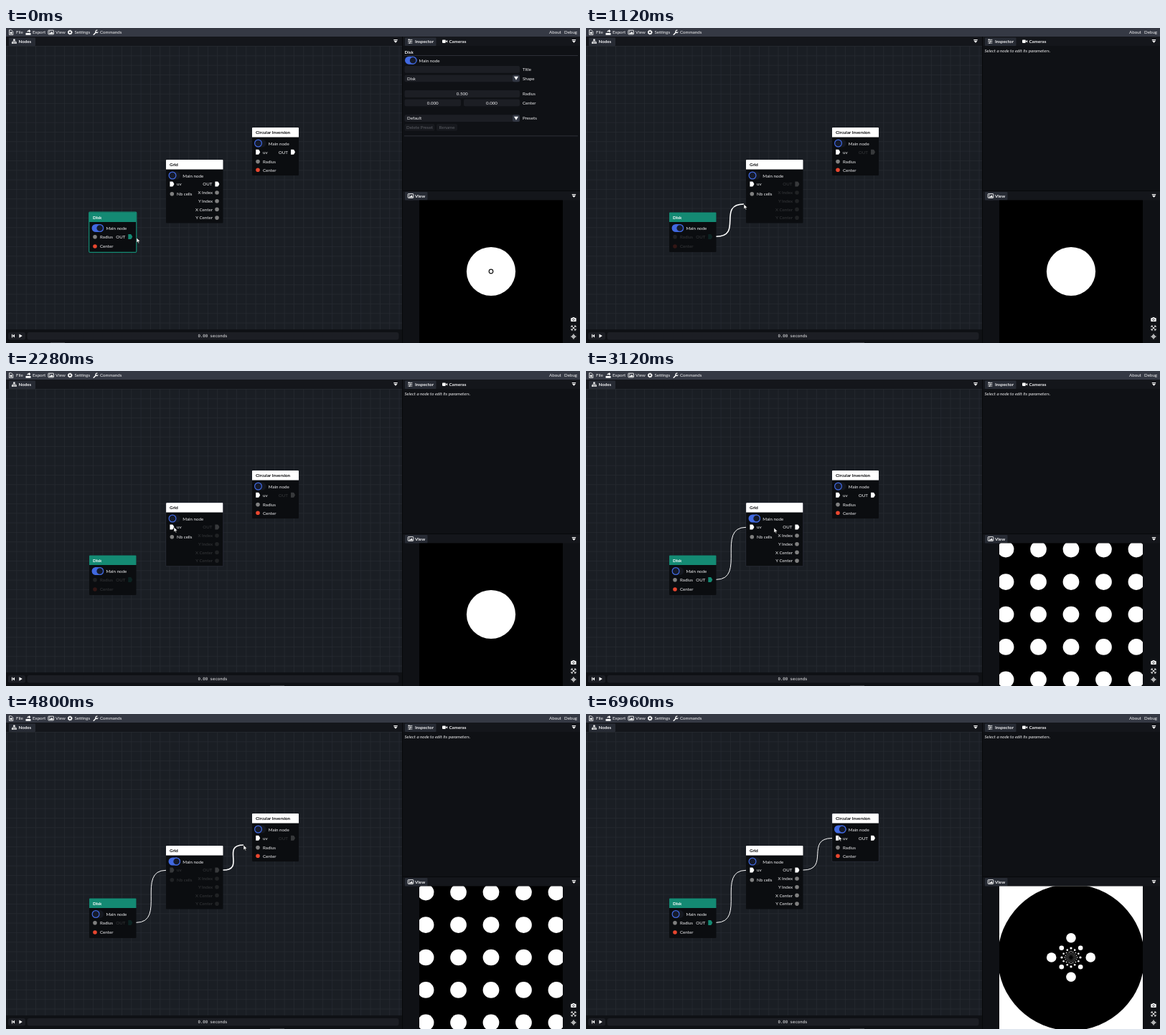
Recreate the animation shown at these times as an HTML page. Size 800 by 440 pixels, loop 7 s.

```html
<!DOCTYPE html>
<html lang="en">
<head>
<meta charset="utf-8">
<title>Node editor</title>
<style>
  html, body { margin: 0; width: 100%; height: 100%; overflow: hidden; background: #0f1115; }
  svg { display: block; width: 800px; height: 440px; }
  text { font: 6.2px Lato, "Open Sans", sans-serif; fill: #f2f2f4; white-space: pre; }
  .bold { font-weight: 700; }
  .italic { font-style: italic; }
  .mono { font: 5.7px "DejaVu Sans Mono", monospace; }
</style>
</head>
<body>
<svg id="stage" viewBox="0 0 800 440" xmlns="http://www.w3.org/2000/svg"></svg>
<script>
const LOOP = 7000, STEP = 40;
const PRESS_1 = 360, RELEASE_1 = 2240, LINKED_1 = 2320;
const PRESS_2 = 3800, RELEASE_2 = 6560, LINKED_2 = 6600;
const TEAL = '#148a73', BLUE = '#4169e1', GREY = '#808080', RED = '#e8462f', WHITE = '#ffffff';
const FIELD = '#1c1e24', PANEL = '#0f1115';

// Drawing helpers; text is placed by its vertical centre.
const rect = (x, y, w, h, fill, r = 0, extra = '') =>
  `<rect x="${x}" y="${y}" width="${w}" height="${h}" rx="${r}" fill="${fill}" ${extra}/>`;
const circle = (x, y, r, fill, extra = '') =>
  `<circle cx="${x}" cy="${y}" r="${r}" fill="${fill}" ${extra}/>`;
const path = (d, fill = WHITE, extra = '') => `<path d="${d}" fill="${fill}" ${extra}/>`;
const text = (x, y, label, { cls = '', anchor = 'start', fill = '' } = {}) =>
  `<text x="${x}" y="${y + 2.2}" class="${cls}" text-anchor="${anchor}" ${fill && `style="fill:${fill}"`}>${label}</text>`;
const stroke = (color, width) => `stroke="${color}" stroke-width="${width}"`;
const group = (id, body) => `<g id="${id}">${body}</g>`;

const toggle = (id, x, y) =>
  rect(x, y - 5.5, 16.5, 11, '#15181f', 5.5, `id="${id}-pill"`) +
  circle(x + 5.5, y, 4.9, '#161b2b', `id="${id}-knob" ${stroke(BLUE, 1.2)}`);

const flowPin = (x, y, color = WHITE) =>
  path(`M${x} ${y - 3.5}h3.2q1 0 1.4 .8l1.4 2.7-1.4 2.7q-.4 .8-1.4 .8h-3.2z`, color);
const dotPin = (x, y, color = GREY) => circle(x, y, 2.8, color);
const menuArrow = (x, y) =>
  path(`M${x - 2.7} ${y - 2.4}h5.4v.9h-5.4zM${x - 2.7} ${y - .6}h5.4l-2.7 3z`);

const nodes = {
  disk: { x: 116, y: 257.5, w: 65.5, h: 55.5, title: 'Disk', color: TEAL, ink: WHITE, pill: [119.6, 279.5] },
  grid: { x: 223, y: 184, w: 79.5, h: 88.5, title: 'Grid', color: WHITE, ink: '#08090b', pill: [226.5, 206] },
  inv: { x: 343, y: 139, w: 65, h: 67, title: 'Circular Inversion', color: WHITE, ink: '#08090b', pill: [346, 161] }
};

const rightText = (x, y, label) => text(x, y, label, { anchor: 'end' });
const ports = {
  disk: {
    in: dotPin(124, 291.8) + text(131, 291.8, 'Radius') + dotPin(124, 305, RED) + text(131, 305, 'Center'),
    out: rightText(166.5, 291.8, 'OUT') + flowPin(170.3, 291.6, TEAL)
  },
  grid: {
    in: flowPin(228.4, 218) + text(238, 218, 'uv') + dotPin(231.3, 231.7) + text(238, 231.7, 'Nb cells'),
    out: rightText(287.5, 218, 'OUT') + flowPin(291.4, 218) +
      ['X Index', 'Y Index', 'X Center', 'Y Center'].map((label, i) => {
        const y = 230 + i * 11.7;
        return rightText(288, y, label) + dotPin(294, y);
      }).join('')
  },
  inv: {
    in: flowPin(348.2, 173.2) + text(358, 173.4, 'uv') + dotPin(351, 186.6) + text(358, 186.6, 'Radius') +
      dotPin(351, 198.3, RED) + text(358, 198.3, 'Center'),
    out: rightText(393, 173.4, 'OUT') + flowPin(397, 173.2)
  }
};

function drawNode(id) {
  const { x, y, w, h, title, color, ink, pill } = nodes[id];
  return rect(x, y, w, h, '#0b0d10', 1) +
    path(`M${x} ${y + 13.4}v-12.4q0-1 1-1h${w - 2}q1 0 1 1v12.4z`, color) +
    text(x + 5, y + 6.8, title, { cls: 'bold', fill: ink }) +
    toggle(id, ...pill) + text(pill[0] + 19.8, pill[1] + .3, 'Main node') +
    group(id + '-in', ports[id].in) + group(id + '-out', ports[id].out) +
    rect(x - .3, y - .3, w + .6, h + .6, 'none', 1.2, `id="${id}-edge"`);
}

function drawMenu() {
  const labels = [[14, 'File'], [37, 'Export'], [69, 'View'], [95.5, 'Settings'], [131, 'Commands'], [757, 'About'], [778, 'Debug']];
  return rect(0, 0, 800, 12, '#353944') +
    path('M4.5 2.8h3l2.3 2.3v4.4h-5.3z', 'none', stroke(WHITE, .8)) + path('M5.7 5.5h2.8v2.8h-2.8z') +
    path('M27.5 7h7v2.8h-7zM29 5.7q1-2.6 3-2.4v-1.2l2.4 2.2-2.4 2.2v-1.4q-1.500-.2-3 .6z') +
    pictureIcon(62.7, 6) +
    circle(89.2, 6, 2.1, 'none', stroke(WHITE, 1.5)) +
    circle(89.2, 6, 3, 'none', stroke(WHITE, .9) + ' stroke-dasharray="1.2 1.156"') +
    path('M122.2 9.300l3.500-3.500', 'none', stroke(WHITE, 1.5) + ' stroke-linecap="round"') +
    path('M127.4 3.400a1.700 1.700 0 1 0 .8 2', 'none', stroke(WHITE, 1.2)) +
    labels.map(([x, label]) => text(x, 6.1, label)).join('');
}

function pictureIcon(x, y) {
  return rect(x - 3.8, y - 2.8, 7.6, 5.7, 'none', .7, stroke(WHITE, .9)) +
    circle(x - 1.800, y - 1, .7, WHITE) + path(`M${x - 3} ${y + 2}l1.500-1.700 1 .8 1.800-2.300 1.900 3.200z`);
}

function cameraIcon(x, y) {
  return rect(x - 3.7, y - 2, 7.4, 5, WHITE, .8) + rect(x - 1.5, y - 3, 3, 1.5, WHITE, .5) +
    circle(x, y + .4, 1.4, WHITE, stroke('#14161a', .7));
}

function drawTabs() {
  const treeIcon = rect(10.2, 15.5, 2.4, 2.2, WHITE) + [8, 10.4, 12.8].map(x => rect(x, 19.6, 1.900, 2.2, WHITE)).join('') +
    path('M11.400 17.500v2M9 19.600v-1h4.800v1', 'none', stroke(WHITE, .6));
  const listIcon = [16.3, 18.600, 20.9].map((y, i) =>
    rect(560.2, y - .4, 6.2, .8, WHITE) + rect(561 + (i * 2) % 3, y - .8, 1.2, 1.6, WHITE)).join('');
  return rect(0, 12, 552, 13, '#14161b') + rect(4, 13.5, 37, 11.5, '#272b34', 1) + treeIcon +
    text(17.5, 18.7, 'Nodes', { cls: 'bold' }) + menuArrow(543, 18.4) +
    rect(553, 12, 247, 13, '#14161b') + rect(556, 13.5, 43.5, 11.5, '#272b34', 1) + listIcon +
    text(570, 18.7, 'Inspector', { cls: 'bold' }) +
    rect(608, 16.500, 4.800, 4.400, WHITE, .8) + path('M613.200 18.300l2-1.400v3.600l-2-1.400z') +
    text(617.5, 18.7, 'Cameras', { cls: 'bold' }) + menuArrow(791.5, 18.4) +
    rect(553, 228, 247, 12.5, '#14161b') + rect(556, 229, 31.500, 11.5, '#272b34', 1) + pictureIcon(564, 234.4) +
    text(570, 234.5, 'View', { cls: 'bold' }) + menuArrow(791.5, 234.4);
}

function drawInspector() {
  const field = (x, y, w, value = '') => rect(x, y - 4.9, w, 9.8, FIELD, 2) + text(x + w / 2, y, value, { anchor: 'middle' });
  const combo = (y, value) => rect(555.5, y - 4.9, 160.5, 9.8, FIELD, 2) + text(559, y, value) +
    rect(706, y - 4.9, 10, 9.8, '#323743', 2) + path(`M708 ${y - 2.500}h6l-3 5z`);
  const button = (x, w, label) => rect(x, 134, w, 9.800, '#17191e', 2) +
    text(x + w / 2, 138.9, label, { anchor: 'middle', fill: '#5c5e64' });
  const labels = [[57.8, 'Title'], [70.3, 'Shape'], [92, 'Radius'], [104.4, 'Center'], [126.2, 'Presets']];
  return text(555.5, 33.5, 'Disk', { cls: 'bold' }) + rect(555, 38, 242, .7, '#3a3d45') +
    toggle('inspect', 556, 45.2) + text(575.5, 45.3, 'Main node') +
    field(555.5, 57.8, 160.5) + combo(70.3, 'Disk') + field(555.5, 92, 160.5, '0.500') +
    field(555.5, 104.4, 78.5, '0.000') + field(638, 104.4, 78, '0.000') + combo(126.2, 'Default') +
    button(555.5, 42, 'Delete Preset') + button(600, 29, 'Rename') +
    labels.map(([y, label]) => text(720, y, label)).join('') + rect(555, 150.5, 242, .7, '#3a3d45');
}

// The preview: cells of a disk, optionally inverted in a circle of radius 0.5.
const UNIT = 68.2, CX = 676, CY = 340, CELL = 2 / 3, DOT = 1 / 6;
function cells(count, place) {
  let out = '';
  for (let i = -count; i <= count; i++) for (let j = -count; j <= count; j++) out += place(i * CELL, j * CELL);
  return out;
}
const dot = (x, y, r) => circle((CX + x * UNIT).toFixed(2), (CY + y * UNIT).toFixed(2), (r * UNIT).toFixed(2), WHITE);
function invertedDot(x, y) {
  if (!x && !y) return '';
  const scale = .25 / (x * x + y * y - DOT * DOT);
  return dot(x * scale, y * scale, DOT * scale);
}

function drawView() {
  const tool = (y, icon) => rect(786, y - 5, 10.5, 10, '#15171b', 2) + icon;
  return rect(576, 240.5, 200, 200, '#000') + '<g clip-path="url(#screen)">' +
    group('view-disk', dot(0, 0, .5) + circle(CX, CY, 2.8, 'none', `id="handle" ${stroke('#111', 1.2)}`)) +
    group('view-grid', cells(2, (x, y) => dot(x, y, DOT))) +
    group('view-inv', rect(576, 240, 200, 200, WHITE) + circle(CX, CY, 1.5 * UNIT, '#000') + cells(10, invertedDot)) +
    '</g>' + tool(407, cameraIcon(791, 407)) +
    tool(419, path('M788 418v-2h2M792 416h2v2M794 420v2h-2M790 422h-2v-2M788.300 416.300l5.400 5.400M793.700 416.300l-5.400 5.400', 'none', stroke(WHITE, .9))) +
    tool(431, circle(791, 431, 2, 'none', stroke(WHITE, .9)) + circle(791, 431, .9, WHITE) +
      path('M791 427.400v2M791 432.600v2M787.400 431h2M792.600 431h2', 'none', stroke(WHITE, .9)));
}

function drawTimeline() {
  return rect(0, 421, 552, 19, PANEL) + rect(3, 425, 24, 10.500, FIELD, 2.500) + rect(29.500, 425, 518, 10.500, FIELD, 3) +
    path('M8 427.700h1v4.800h-1zM12 427.700v4.800l-3-2.400zM18.400 427.400v5.400l4.400-2.700z') +
    text(288, 430.2, '0.00 seconds', { cls: 'mono', anchor: 'middle' });
}

const stage = document.getElementById('stage');
stage.innerHTML = `<defs>
  <pattern id="mesh" width="13.33" height="13.33" patternUnits="userSpaceOnUse" x="1" y="25">
    <path d="M.4 0V13.33M0 .4H13.33" fill="none" stroke="#262a30" stroke-width=".8"/></pattern>
  <clipPath id="screen"><rect x="576" y="240.5" width="200" height="199.5"/></clipPath></defs>` +
  rect(0, 0, 800, 440, PANEL) + rect(0, 25, 552, 396, '#1a1e24') + rect(0, 25, 552, 396, 'url(#mesh)') +
  drawMenu() + drawTabs() + rect(552, 12, 1, 428, '#07080a') + rect(553, 227, 247, 1, '#07080a') +
  group('inspector', drawInspector()) +
  group('hint', text(555.5, 32, 'Select a node to edit its parameters.', { cls: 'italic' })) +
  Object.keys(nodes).map(drawNode).join('') +
  ['link1', 'link2'].map(id => path('', 'none', `id="${id}" stroke="#fff"`)).join('') +
  drawView() + drawTimeline() + rect(62, 439, 20, 1, '#3b3e43', 0, 'id="strip"') +
  path('M0 0V6.800L1.600 5.400 2.600 7.700 3.700 7.200 2.700 5H4.900Z', WHITE, `id="cursor" ${stroke('#111', .5)}`);

const parts = {};
stage.querySelectorAll('[id]').forEach(el => parts[el.id] = el);
const set = (id, attrs) => { for (const key in attrs) parts[id].setAttribute(key, attrs[key]); };
const show = (id, on) => set(id, { visibility: on ? 'visible' : 'hidden' });

// Cursor stops: time, x, y
const stops = [
  [0, 182, 293], [320, 174, 292], [440, 174, 292], [760, 190, 282], [1120, 220, 246], [1440, 232, 216],
  [2280, 234, 218], [2700, 246, 219], [3120, 262, 219], [3600, 296, 218], [3840, 296, 218], [4400, 314, 205],
  [4800, 331, 183], [5080, 332, 178], [5680, 340, 174], [5800, 349, 172], [6560, 352, 171], [7000, 352, 170]
];
function cursorAt(t) {
  const k = stops.findIndex(s => s[0] > t);
  const [a, b] = [stops[k - 1], stops[k]];
  const f = (t - a[0]) / (b[0] - a[0]);
  return [a[1] + (b[1] - a[1]) * f, a[2] + (b[2] - a[2]) * f];
}

const inside = ([x, y], n) => x >= n.x && x <= n.x + n.w && y >= n.y && y <= n.y + n.h;

function curve([ax, ay], [bx, by]) {
  const half = Math.hypot(bx - ax, by - ay) / 2, strength = 42;
  const bend = half < strength ? strength * Math.sin(Math.PI / 2 * half / strength) : strength;
  return `M${ax} ${ay}C${ax + bend} ${ay} ${bx - bend} ${by} ${bx} ${by}`;
}

function updateLink(id, from, to, pointer, t, press, release, linked) {
  const dragging = t >= press && t < release;
  show(id, dragging || t >= linked);
  const snapped = t >= linked || pointer[0] >= to[0];
  set(id, { d: curve(from, snapped ? to : pointer), 'stroke-width': dragging ? 1.6 : 1 });
}

function updateToggle(id, x, amount) {
  set(id + '-knob', { cx: x + 5.5 + 5.6 * amount });
  set(id + '-pill', { fill: amount > .02 ? BLUE : '#15181f', 'fill-opacity': amount > .02 ? amount : 1 });
}

function render(t) {
  const pointer = cursorAt(t);
  const selected = t < PRESS_1;
  const source = t >= PRESS_1 && t < LINKED_1 ? 'disk' : t >= PRESS_2 && t < LINKED_2 ? 'grid' : '';
  const view = t < LINKED_1 ? 'disk' : t < LINKED_2 ? 'grid' : 'inv';
  const ease = start => Math.min(1, Math.max(0, (t - start) / 160));
  const first = ease(LINKED_1), second = ease(LINKED_2);
  const main = { disk: 1 - first, grid: first - second, inv: second };

  for (const id in nodes) {
    const picked = id === 'disk' && selected;
    set(id + '-in', { opacity: source === id ? .18 : 1 });
    set(id + '-out', { opacity: source ? .18 : 1 });
    set(id + '-edge', { stroke: picked ? TEAL : '#2b303b', 'stroke-width': picked ? 1.2 : .7 });
    show(id + '-edge', picked || inside(pointer, nodes[id]));
    show('view-' + id, view === id);
    updateToggle(id, nodes[id].pill[0], main[id]);
  }
  updateToggle('inspect', 556, 1);
  show('inspector', selected);
  show('hint', !selected);
  set('handle', { opacity: selected ? 1 : 0 });
  set('strip', { x: selected ? 62 : 368 });
  updateLink('link1', [181.5, 291.3], [223, 218.3], pointer, t, PRESS_1, RELEASE_1, LINKED_1);
  updateLink('link2', [302.5, 218], [343, 173.5], pointer, t, PRESS_2, RELEASE_2, LINKED_2);
  set('cursor', { transform: `translate(${pointer})` });
}

const start = performance.now();
function tick() {
  const t = (performance.now() - start) % LOOP;
  render(Math.floor(t / STEP) * STEP);
  requestAnimationFrame(tick);
}
tick();
</script>
</body>
</html>
```
